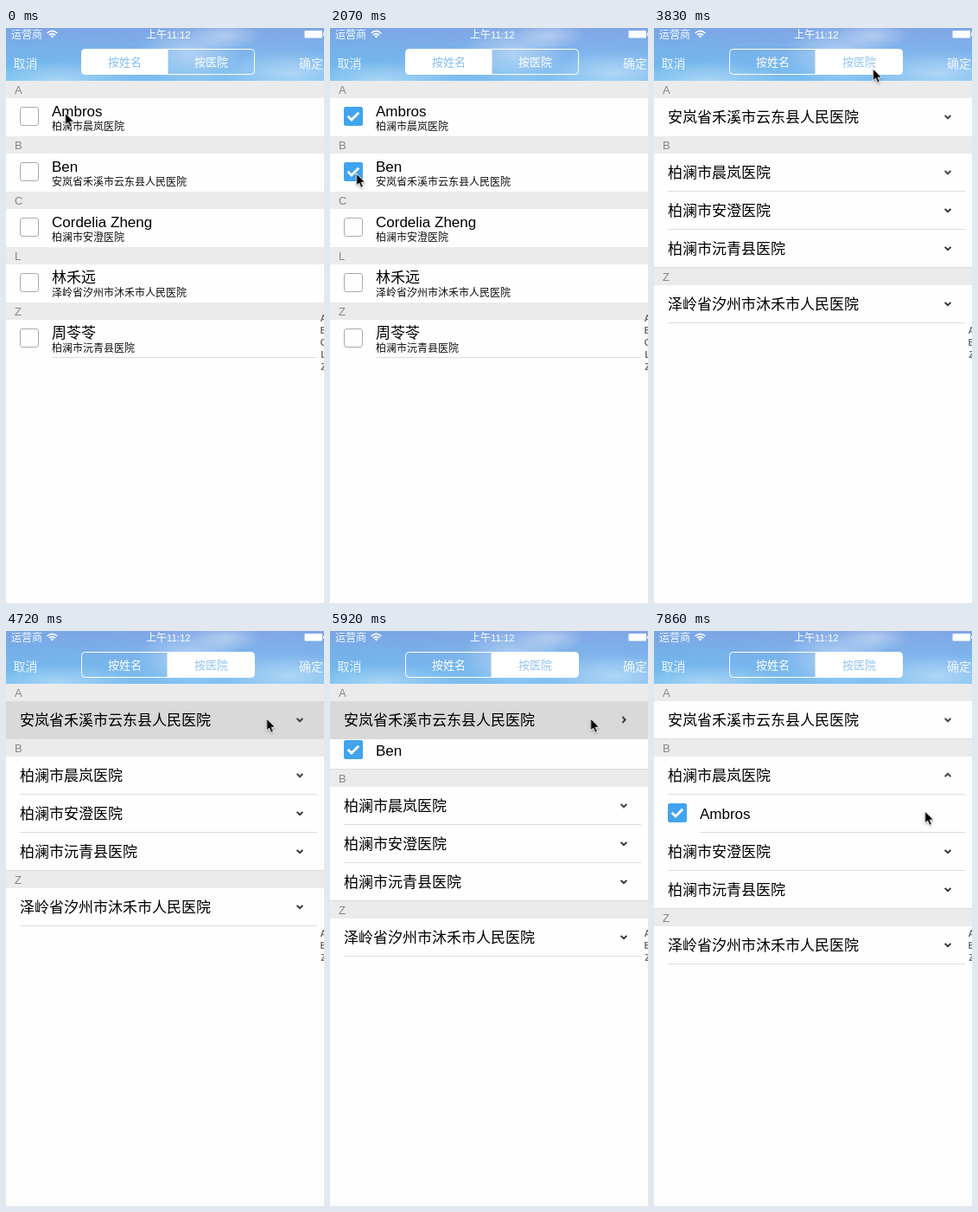
An HTML page for the animation above (8000 ms loop, 368 by 664 pixels).

```html
<!DOCTYPE html>
<html lang="zh-CN">
<head>
<meta charset="utf-8">
<title>选择联系人</title>
<style>
html, body { margin: 0; width: 100%; height: 100%; overflow: hidden; background: #fefefe; }
svg { display: block; width: 368px; height: 664px; }
text { font-family: "Liberation Sans", "Noto Sans CJK SC", "Noto Sans CJK", sans-serif; font-weight: 350; white-space: pre; }
</style>
</head>
<body>
<svg id="stage" viewBox="0 0 368 664" xmlns="http://www.w3.org/2000/svg">
  <defs>
    <linearGradient id="sky" x1="0" y1="0" x2="1" y2="0">
      <stop offset="0" stop-color="#6eb5eb"/><stop offset=".3" stop-color="#78b4ec"/>
      <stop offset=".62" stop-color="#8fbdf0"/><stop offset="1" stop-color="#82b8f0"/>
    </linearGradient>
    <linearGradient id="dusk" x1="0" y1="0" x2="0" y2="1">
      <stop offset="0" stop-color="#7f9fe2" stop-opacity=".75"/>
      <stop offset="1" stop-color="#72c4f2" stop-opacity=".45"/>
    </linearGradient>
    <radialGradient id="glow">
      <stop offset="0" stop-color="#fff" stop-opacity=".38"/>
      <stop offset="1" stop-color="#fff" stop-opacity="0"/>
    </radialGradient>
    <filter id="soft" x="-50%" y="-50%" width="200%" height="200%">
      <feDropShadow dx="0" dy="1" stdDeviation=".8" flood-opacity=".35"/>
    </filter>
  </defs>
</svg>
<script>
const LOOP = 8000, BG = '#fefefe', LINE = '#dcdcdc';
const stage = document.getElementById('stage');

function add(parent, tag, attrs = {}, content) {
  const el = document.createElementNS(stage.namespaceURI, tag);
  for (const key in attrs) el.setAttribute(key, attrs[key]);
  if (content) el.textContent = content;
  return parent.appendChild(el);
}
const group = (parent, x = 0, y = 0) => add(parent, 'g', { transform: `translate(${x} ${y})` });
const rect = (parent, x, y, width, height, fill, more) =>
  add(parent, 'rect', { x, y, width, height, fill, ...more });
const text = (parent, x, y, size, str, fill = '#000', more) =>
  add(parent, 'text', { x, y, 'font-size': size, fill, ...more }, str);
const stroke = (parent, d, color, width, more) =>
  add(parent, 'path', { d, fill: 'none', stroke: color, 'stroke-width': width, ...more });

// rows: [time, value], each value held until the next time
function play(el, prop, rows) {
  const frames = rows.map(([t, v]) => ({ offset: t / LOOP, [prop]: v, easing: 'step-end' }));
  frames.push({ offset: 1, [prop]: rows[rows.length - 1][1] });
  el.animate(frames, { duration: LOOP, iterations: Infinity });
}
const slide = (el, rows) => play(el, 'transform', rows.map(([t, y]) => [t, `translate(0px, ${y}px)`]));
const spin = (el, rows) => play(el, 'transform', rows.map(([t, a]) => [t, `rotate(${a}deg)`]));

function glide(times, [x0, y0], [x1, y1]) {
  return times.map((t, i) => {
    const p = (i + 1) / times.length, e = p * p * (3 - 2 * p);
    return [t, x0 + (x1 - x0) * e, y0 + (y1 - y0) * e];
  });
}

function header(parent, y, letter) {
  rect(parent, 0, y, 368, 20, '#ebebeb');
  text(parent, 10, y + 15, 13, letter, '#858585');
}

function box(parent, x, y, checkRows) {
  const g = group(parent, x, y);
  rect(g, .5, .5, 21, 21, BG, { rx: 2.5, stroke: '#ababab' });
  const on = group(g);
  rect(on, 0, 0, 22, 22, '#41a4ee', { rx: 2.5 });
  stroke(on, 'M4.6 10.8 L9 15 L17.2 6.8', '#fff', 2.8);
  play(on, 'opacity', checkRows);
}

function cell(parent, y, glowRows) {
  rect(parent, 0, y, 368, 44, BG);
  if (glowRows) play(rect(parent, 0, y, 368, 44, '#d9d9d9'), 'opacity', glowRows);
}

function index(parent, top, letters) {
  [...letters].forEach((c, i) => text(parent, 367.5, top + 4 + i * 14, 11, c, '#707074',
    { 'text-anchor': 'middle', style: 'font-weight:700' }));
}

// List by name
const byName = group(stage);
[
  ['A', 'Ambros', '柏澜市晨岚医院', 730, 880],
  ['B', 'Ben', '安岚省禾溪市云东县人民医院', 1920, 2070],
  ['C', 'Cordelia Zheng', '柏澜市安澄医院'],
  ['L', '林禾远', '泽岭省汐州市沐禾市人民医院'],
  ['Z', '周苓苓', '柏澜市沅青县医院']
].forEach(([letter, name, place, press, check], i) => {
  const y = 61 + i * 64;
  header(byName, y, letter);
  cell(byName, y + 20, press && [[0, 0], [press, 1], [check, 0]]);
  box(byName, 16, y + 30, check ? [[0, 0], [check, 1]] : [[0, 0]]);
  text(byName, 53, y + 41, 17, name);
  text(byName, 53, y + 57, 12, place, '#111');
});
rect(byName, 53, 380, 307, 1, LINE);
index(byName, 335, 'ABCLZ');
play(byName, 'opacity', [[0, 1], [3240, 0]]);

// List by hospital
function place(parent, y, name, glowRows, turnRows) {
  cell(parent, y, glowRows);
  text(parent, 16, y + 28, 17, name);
  const arrow = add(group(parent, 340, y + 21.5), 'path', {
    d: 'M-3.4 -1.6 L0 1.7 L3.4 -1.6', fill: 'none', stroke: '#2c2c34', 'stroke-width': 1.9
  });
  if (turnRows) spin(arrow, turnRows);
}
function person(parent, y, name) {
  rect(parent, 0, y, 368, 44, BG);
  box(parent, 16, y + 10, [[0, 1]]);
  text(parent, 53, y + 28, 17, name);
}
const rule = (parent, y, x = 16, w = 344) => rect(parent, x, y, w, 1, LINE);

const openA = [[0, 0], [4870, 20], [5020, 41], [5170, 44], [5920, 35], [6070, 4], [6220, 0]];
const openB = [[0, 0], [7110, 29], [7260, 44]];

const byPlace = group(stage);
play(byPlace, 'opacity', [[0, 0], [3240, 1]]);

const subA = add(byPlace, 'g');
person(subA, 81, 'Ben');
slide(subA, openA);
header(byPlace, 61, 'A');
place(byPlace, 81, '安岚省禾溪市云东县人民医院',
  [[0, 0], [4720, 1], [5020, .5], [5170, 0], [5920, 1], [6070, .8], [6220, 0]],
  [[0, 0], [4870, -90], [5020, -180], [5920, -90], [6070, 0]]);

const rest = add(byPlace, 'g');
slide(rest, openA);
const subB = add(rest, 'g');
person(subB, 145, 'Ambros');
rule(subB, 188, 53, 307);
slide(subB, openB);
header(rest, 125, 'B');
play(rule(rest, 124, 0, 368), 'opacity', [[0, 0], [4720, 1], [6220, 0], [6960, 1]]);
place(rest, 145, '柏澜市晨岚医院',
  [[0, 0], [6960, 1], [7110, .6], [7260, 0]],
  [[0, 0], [7110, -120], [7260, -180]]);
rule(rest, 188);

const tail = add(rest, 'g');
slide(tail, openB);
place(tail, 189, '柏澜市安澄医院');
rule(tail, 232);
place(tail, 233, '柏澜市沅青县医院');
header(tail, 277, 'Z');
rule(tail, 276, 0, 368);
place(tail, 297, '泽岭省汐州市沐禾市人民医院');
rule(tail, 340);
index(byPlace, 349, 'ABZ');

// Top bar
const bar = group(stage);
rect(bar, 0, 0, 368, 61, 'url(#sky)');
rect(bar, 0, 0, 368, 61, 'url(#dusk)');
[[212, 30, 60, 34], [60, 60, 90, 22], [330, 52, 80, 26], [255, 8, 40, 16]].forEach(([cx, cy, rx, ry]) =>
  add(bar, 'ellipse', { cx, cy, rx, ry, fill: 'url(#glow)', style: 'clip-path:inset(0)' }));
rect(bar, 0, 61, 368, 20, '#ebebeb');
text(bar, 10, 76, 13, 'A', '#858585');

text(bar, 6, 11.5, 12, '运营商', '#f4f9ff');
stroke(bar, 'M47.6 6 Q53.5 .8 59.4 6 M49.8 8.1 Q53.5 5 57.2 8.1', '#fff', 1.6);
add(bar, 'path', { d: 'M51.5 9.4 Q53.5 7.8 55.5 9.4 L53.5 11.6 Z', fill: '#fff' });
const clock = text(bar, 162, 11.5, 12, '上午', '#fff', { style: 'font-weight:500' });
add(clock, 'tspan', { 'font-size': 11.3 }, '11:12');
rect(bar, 345.5, 3, 20.5, 8.5, '#fff', { rx: 1 });
rect(bar, 367, 5.5, 1, 3.5, '#fff');

text(bar, 8.5, 45.5, 14, '取消', '#eef7ff');
text(bar, 339, 45.5, 14, '确定', '#eef7ff');

const left = add(bar, 'path', { d: 'M187 24.5 H91.5 a4 4 0 0 0 -4 4 V49.5 a4 4 0 0 0 4 4 H187 Z', fill: '#fff' });
const right = add(bar, 'path', { d: 'M187 24.5 H283.5 a4 4 0 0 1 4 4 V49.5 a4 4 0 0 1 -4 4 H187 Z', fill: '#fff' });
rect(bar, 87.5, 24.5, 200, 29, 'none', { rx: 4, stroke: '#fff' });
rect(bar, 186.5, 24.5, 1, 29, '#fff');
play(left, 'opacity', [[0, 1], [3090, .87], [3240, 0]]);
play(right, 'opacity', [[0, 0], [3090, .25], [3240, 1]]);
const tab = (x, str, rows) =>
  play(text(bar, x, 44, 13, str, '#fff', { 'text-anchor': 'middle' }), 'fill', rows);
tab(137.5, '按姓名', [[0, '#84bfef'], [3090, '#98c9f2'], [3240, '#ffffff']]);
tab(237.5, '按医院', [[0, '#ffffff'], [3090, '#b4d5f7'], [3240, '#92c5f1']]);

// Pointer
const pointer = add(stage, 'path', {
  d: 'M0 0 V14.2 L3.2 11.2 L5.4 16.4 L8 15.3 L5.8 10.2 H10.2 Z',
  fill: '#000', stroke: '#fff', 'stroke-width': 1, 'stroke-linejoin': 'round', filter: 'url(#soft)'
});
const stops = [
  [0, 68.5, 98],
  ...glide([140, 290, 430], [68.5, 98], [26.5, 98]),
  [1180, 29.5, 117], [1330, 31, 144], [1480, 30.5, 162], [1620, 30.5, 168],
  ...glide([2360, 2510, 2650, 2800], [30.5, 168], [249.5, 42.5]),
  ...glide([3690, 3840, 3980, 4130, 4280, 4420], [249.5, 42.5], [301.5, 101]),
  ...glide([6370, 6520, 6670], [301.5, 101], [313.5, 172]),
  [7860, 313.5, 208]
];
play(pointer, 'transform', stops.map(([t, x, y]) => [t, `translate(${x}px, ${y}px)`]));
</script>
</body>
</html>
```
